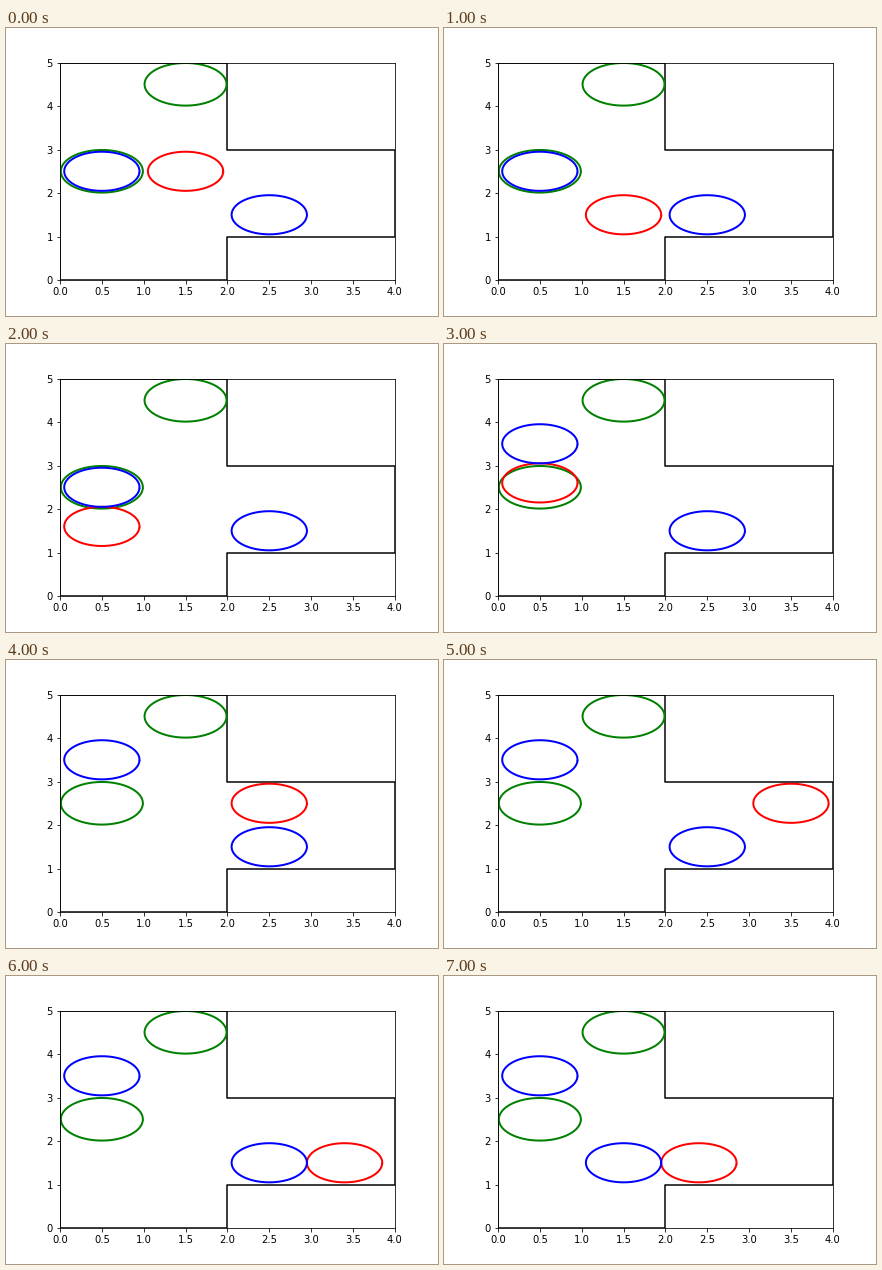
Animation of 432 by 288 pixels, one loop 8000 ms. Source, as a matplotlib script:

```python
import numpy as np
import matplotlib.pyplot as plt
from matplotlib.animation import FuncAnimation

plt.rcParams["font.family"] = "DejaVu Sans"
plt.rcParams["font.size"] = 10

BODY, GOAL = 0.45, 0.49
ANGLES = np.arange(0, 2 * np.pi, 0.1)
STEPS = 4  # two walking steps, contact, push

# One task per box: where the robot enters, its walking step,
# where the box stands and the direction it is pushed
TASKS = np.array([
    [(1.5, 2.5), (0, -1), (0.5, 2.5), (0, 1)],
    [(2.5, 2.5), (1, 0), (2.5, 1.5), (-1, 0)],
])


def ring(center, radius):
    x, y = center
    return x + radius * np.cos(ANGLES), y + radius * np.sin(ANGLES)


def draw_ring(center, radius, color):
    return ax.plot(*ring(center, radius), color=color, lw=2)[0]


def robot_at(frame):
    task, step = divmod(frame, STEPS)
    entry, walk, box, push = TASKS[task]
    if step < 2:
        return entry + step * walk
    return box + (step - 2 - 2 * BODY) * push


def box_at(task, frame):
    _, _, box, push = TASKS[task]
    pushed = frame >= STEPS * (task + 1) - 1
    return box + pushed * push


fig, ax = plt.subplots(figsize=(6, 4), dpi=72, facecolor="white")
fig.subplots_adjust(left=0.125, right=0.9, bottom=0.125, top=0.88)
ax.set(xlim=(0, 4), ylim=(0, 5))

walls = [(0, 0), (2, 0), (2, 1), (4, 1), (4, 3), (2, 3), (2, 5), (0, 5), (0, 0)]
ax.plot(*zip(*walls), color="black", lw=1.5)
for goal in [(0.5, 2.5), (1.5, 4.5)]:
    draw_ring(goal, GOAL, "green")
robot = draw_ring(robot_at(0), BODY, "red")
boxes = [draw_ring(box_at(task, 0), BODY, "blue") for task in range(len(TASKS))]


def update(frame):
    robot.set_data(*ring(robot_at(frame), BODY))
    for task, box in enumerate(boxes):
        box.set_data(*ring(box_at(task, frame), BODY))
    return [robot, *boxes]


anim = FuncAnimation(fig, update, frames=STEPS * len(TASKS), interval=1000,
                     repeat=True, repeat_delay=0)
plt.show()
```
